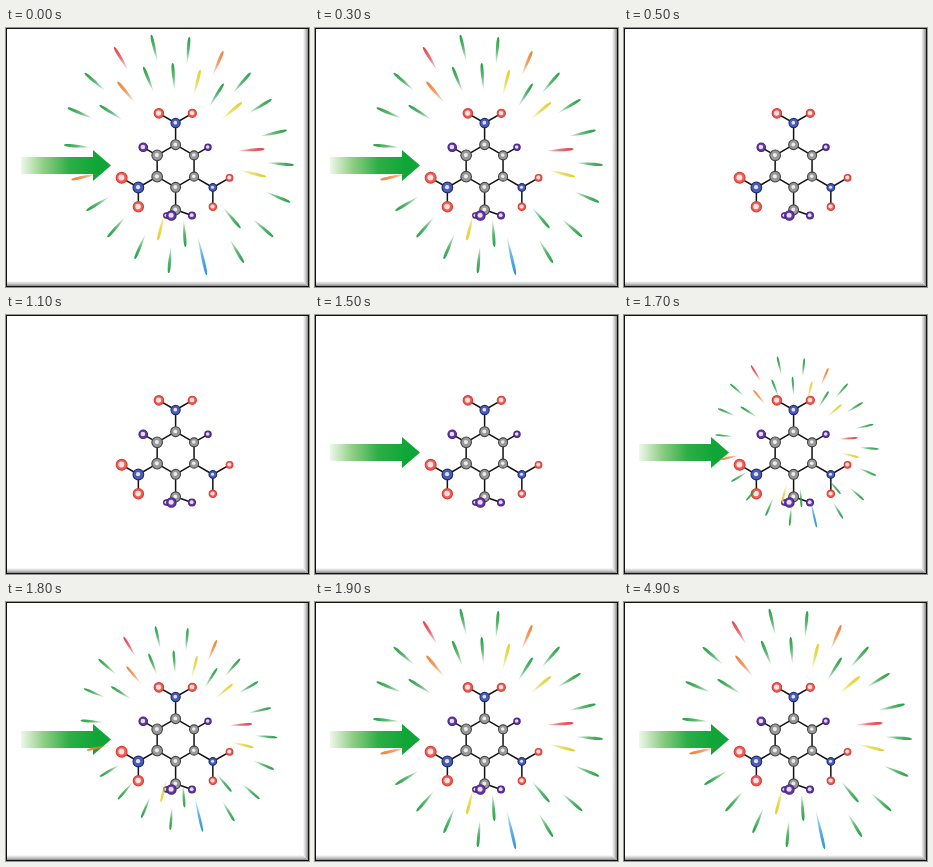
Write an HTML page that moves like this. It is 303 by 259 pixels and loops after 6.9 s.

```html
<!DOCTYPE html>
<html lang="en">
<head>
<meta charset="utf-8">
<title>Molecule burst</title>
<style>
html, body { margin: 0; width: 100%; height: 100%; overflow: hidden; background: #fff; }
svg { display: block; width: 303px; height: 259px; }
</style>
</head>
<body>
<svg viewBox="0 0 303 259" xmlns="http://www.w3.org/2000/svg">
  <defs id="defs">
    <linearGradient id="shaft" gradientUnits="userSpaceOnUse" x1="15" y1="0" x2="90" y2="0">
      <stop offset="0" stop-color="#eff8ea"/>
      <stop offset=".3" stop-color="#8fce85"/>
      <stop offset=".65" stop-color="#2cae46"/>
      <stop offset="1" stop-color="#0fa637"/>
    </linearGradient>
    <linearGradient id="edgeR">
      <stop offset="0" stop-color="#fff"/>
      <stop offset=".5" stop-color="#c4c4c4"/>
      <stop offset="1" stop-color="#666"/>
    </linearGradient>
    <linearGradient id="edgeB" href="#edgeR" x2="0" y2="1"/>
  </defs>
  <rect width="303" height="259" fill="#fff"/>
  <path d="M297 0H303V259L297 253Z" fill="url(#edgeR)"/>
  <path d="M0 253H297L303 259H0Z" fill="url(#edgeB)"/>
  <rect x=".5" y=".5" width="302" height="258" fill="none" stroke="#111"/>
  <path id="arrow" d="M15 129H87V122L105 137.5L87 153V146H15Z" fill="url(#shaft)"/>
  <g id="bonds" stroke="#111" stroke-width="1.5"></g>
  <g id="atoms"></g>
  <g id="burst"></g>
</svg>
<script>
const $ = id => document.getElementById(id);
const rad = deg => deg * Math.PI / 180;

function add(parent, tag, attrs) {
  const el = document.createElementNS('http://www.w3.org/2000/svg', tag);
  for (const k in attrs) el.setAttribute(k, attrs[k]);
  return parent.appendChild(el);
}

// Angles run clockwise from straight up
const polar = (p, deg, r) => ({ x: p.x + r * Math.sin(rad(deg)), y: p.y - r * Math.cos(rad(deg)) });

// Molecule
const kinds = {
  C: { r: 5.4, rim: '#444', body: '#999', shine: .36 },
  N: { r: 5.1, rim: '#1d2b78', body: '#4a5cb4', shine: .36 },
  O: { r: 4.9, rim: '#dc3a30', body: '#ee5f55', shine: .5 },
  H: { r: 4.2, rim: '#45208a', body: '#6539a0', shine: .48 }
};

function atom(kind, p, size = 1) {
  const { r, rim, body, shine } = kinds[kind];
  const R = r * size * (1 + (170 - p.x) * .004); // nearer on the left
  add($('atoms'), 'circle', { cx: p.x, cy: p.y, r: R - .5, fill: body, stroke: rim, 'stroke-width': 1.1 });
  add($('atoms'), 'circle', { cx: p.x - .3, cy: p.y - .3, r: R * shine, fill: '#f7f5f8', 'fill-opacity': .88 });
  return p;
}

function bond(a, b) {
  add($('bonds'), 'line', { x1: a.x, y1: a.y, x2: b.x, y2: b.y });
}

const hub = { x: 169.6, y: 138 };
const ring = deg => polar(hub, deg, 21.3);

for (let deg = 0; deg < 360; deg += 60) {
  bond(ring(deg), ring(deg + 60));
  atom('C', ring(deg));
}
for (const deg of [0, 120, 240]) {
  const n = atom('N', polar(hub, deg, 43));
  bond(ring(deg), n);
  for (const side of [-60, 60]) bond(n, atom('O', polar(n, deg + side, 19.3)));
}
for (const deg of [60, 300]) bond(ring(deg), atom('H', polar(hub, deg, 37.4)));

const methyl = atom('C', polar(hub, 180, 43.8));
bond(ring(180), methyl);
for (const [dx, size] of [[16.4, 1], [-9.2, .75], [-4.2, 1.22]]) {
  bond(methyl, atom('H', { x: methyl.x + dx, y: methyl.y + 5.7 }, size));
}

// Burst: one slot every 9 degrees, odd slots on the inner ring
const inks = { g: '#27a044', y: '#e3cf2c', o: '#ee7f35', r: '#e2414c', b: '#2b97d8' };
const slots = 'gyoggyg-grgyg-ggg-bggyg-g-g-o-g-gggorggg';
const heart = { x: 173, y: 127 };

for (const ink in inks) {
  const fade = add($('defs'), 'linearGradient', { id: ink, x2: 0, y2: 1 });
  add(fade, 'stop', { offset: 0, 'stop-color': inks[ink] });
  add(fade, 'stop', { offset: .5, 'stop-color': inks[ink], 'stop-opacity': .75 });
  add(fade, 'stop', { offset: 1, 'stop-color': inks[ink], 'stop-opacity': .15 });
}
[...slots].forEach((ink, i) => {
  if (ink === '-') return;
  const deg = 5 + 9 * i;
  const reach = (117 + 9 * Math.cos(rad(2 * (deg - 145)))) * (i % 2 ? .76 : 1);
  const len = ink === 'b' ? 40 : 27;
  add($('burst'), 'path', {
    d: `M0 ${-reach}C2.2 ${-reach} 1.8 ${-reach + len * .5} 0 ${-reach + len}` +
       `C-1.8 ${-reach + len * .5} -2.2 ${-reach} 0 ${-reach}Z`,
    fill: `url(#${ink})`,
    transform: `rotate(${deg})`
  });
});

// Timeline in ms
const loop = 6900, hide = 500, point = 1500, blast = 1600;
const origin = performance.now();

function spread(t) {
  if (t < hide) return 1;
  if (t < blast) return 0;
  return Math.min(1, .565 + .145 * Math.floor((t - blast) / 100));
}

function draw(now) {
  const t = Math.max(0, now - origin) % loop;
  const scale = spread(t);
  $('arrow').style.display = t < hide || t >= point ? '' : 'none';
  $('burst').style.display = scale ? '' : 'none';
  $('burst').setAttribute('transform', `translate(${heart.x} ${heart.y}) scale(${scale})`);
  requestAnimationFrame(draw);
}
draw(origin);
</script>
</body>
</html>
```
